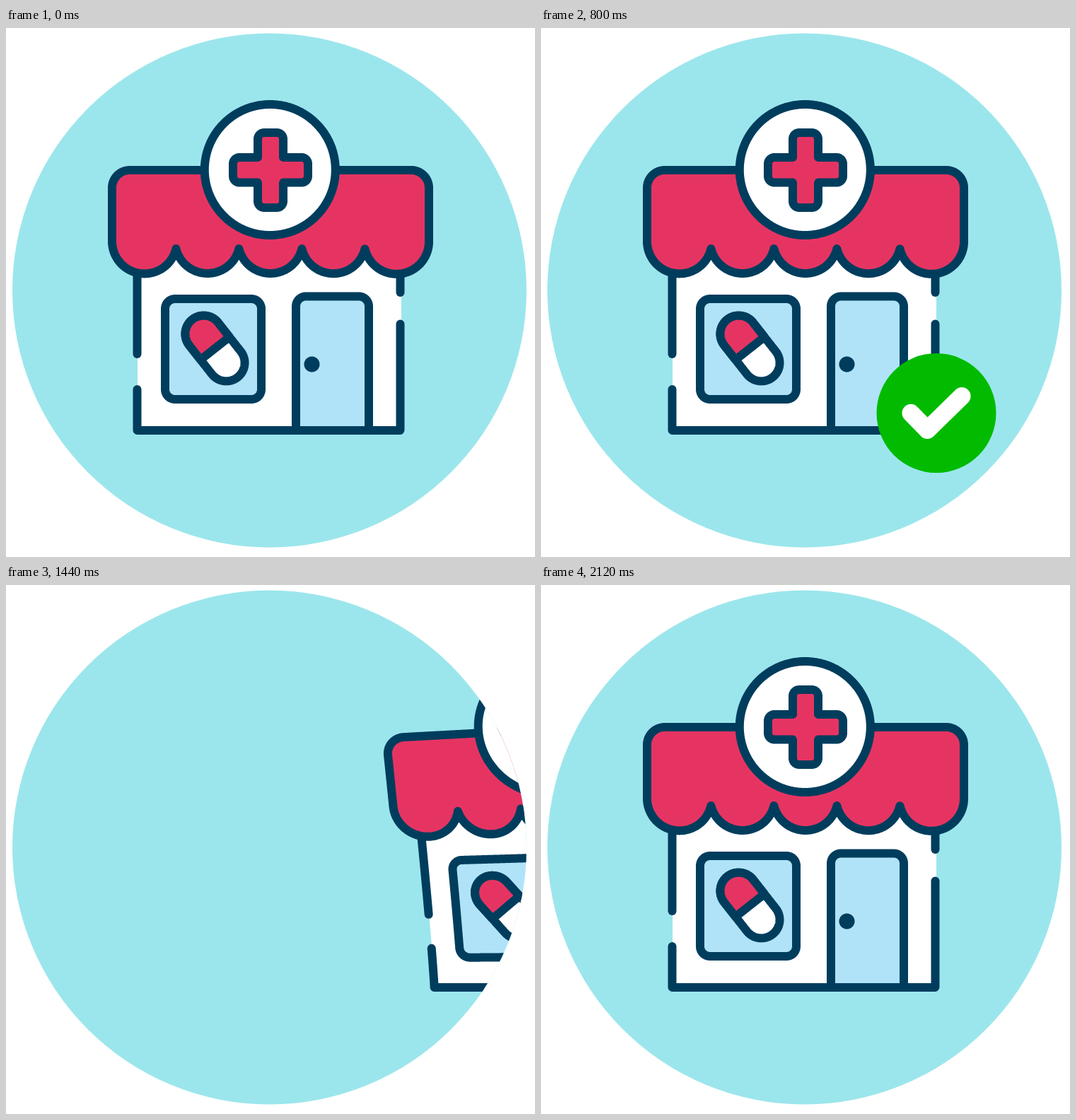
An HTML page with a canvas for the animation above (2160 ms loop, 748 by 748 pixels).

```html
<!DOCTYPE html>
<html lang="en">
<head>
<meta charset="utf-8">
<title>Pharmacy</title>
<style>
html, body { margin: 0; width: 100%; height: 100%; overflow: hidden; background: #fff; }
canvas { display: block; width: 748px; height: 748px; }
</style>
</head>
<body>
<canvas id="stage"></canvas>
<script>
const SIZE = 748, LOOP = 2160, TICK = 40, GROUND = 569;
const NAVY = '#003d5d', RED = '#e63462', GLASS = '#b0e3f8', SKY = '#9be6ec', GREEN = '#02bb01', WHITE = '#fff';

const canvas = document.getElementById('stage');
const ratio = window.devicePixelRatio || 1;
canvas.width = canvas.height = SIZE * ratio;
const ctx = canvas.getContext('2d');

// Turns path data into closely spaced points, so that it can be bent.
function sample(d) {
  const path = document.createElementNS('http://www.w3.org/2000/svg', 'path');
  path.setAttribute('d', d);
  const length = path.getTotalLength(), count = Math.ceil(length);
  return Array.from({ length: count + 1 }, (_, i) => path.getPointAtLength(length * i / count));
}

const shape = (d, fill, line = NAVY) => ({ points: sample(d), closed: /Z$/.test(d), fill, line });

const disc = (x, y, r) => `M${x - r} ${y}a${r} ${r} 0 0 1 ${2 * r} 0a${r} ${r} 0 0 1 ${-2 * r} 0Z`;

const box = (x, y, w, h, r) =>
  `M${x + r} ${y}h${w - 2 * r}a${r} ${r} 0 0 1 ${r} ${r}v${h - 2 * r}a${r} ${r} 0 0 1 ${-r} ${r}` +
  `h${2 * r - w}a${r} ${r} 0 0 1 ${-r} ${-r}v${2 * r - h}a${r} ${r} 0 0 1 ${r} ${-r}Z`;

const scallop = (x, y = 312) => `A45.8 45.8 0 0 0 ${x} ${y}`;
const awning = 'M150 226V302' + [240.4, 329.4, 418.4, 507.5].map(x => scallop(x)).join('') +
  scallop(598, 302) + 'V226A25 25 0 0 0 573 201H175A25 25 0 0 0 150 226Z';

const cross = 'M365 148h18a9 9 0 0 1 9 9v26h26a9 9 0 0 1 9 9v17.5a9 9 0 0 1 -9 9h-26v26.5' +
  'a9 9 0 0 1 -9 9h-18a9 9 0 0 1 -9 -9v-26.5h-26a9 9 0 0 1 -9 -9v-17.5a9 9 0 0 1 9 -9h26v-26a9 9 0 0 1 9 -9Z';

const pill = 'M299.4 415.9L332.4 457.9A26 26 0 0 1 291.6 490.1L258.6 448.1A26 26 0 0 1 299.4 415.9Z';
const pillTop = 'M275.1 469.1L258.6 448.1A26 26 0 0 1 299.4 415.9L315.9 436.9Z';

const shop = [
  shape('M186 308H559V569H186Z', WHITE, null),
  shape('M185.5 340V461'),
  shape('M557.5 340V374'),
  shape('M185.5 511V569H557.5V418.5'),
  shape(box(225, 383, 136, 142, 14), GLASS),
  shape(pill, WHITE),
  shape(pillTop, RED),
  shape('M410 569V393.5A14 14 0 0 1 424 379.5H499A14 14 0 0 1 513 393.5V569Z', GLASS),
  shape(disc(432.5, 475.5, 11), NAVY, null),
  shape(awning, RED),
  shape(disc(373.3, 200.5, 92.5), WHITE),
  shape(cross, RED)
];

// Steps of [time, value], eased by a sine in between.
const LEAN = [[880, 0], [1020, 1.05], [1215, -2.05], [1300, -2], [1560, -1.35], [1800, 1], [1980, 0]];
const BADGE = [[20, 0], [280, 1.1], [420, 1], [640, 1], [760, 1.1], [940, 0]];

function tween(steps, t) {
  const next = steps.findIndex(step => step[0] > t);
  if (next === 0) return steps[0][1];
  if (next < 0) return steps[steps.length - 1][1];
  const [t0, v0] = steps[next - 1], [t1, v1] = steps[next];
  return v0 + (v1 - v0) * (1 - Math.cos(Math.PI * (t - t0) / (t1 - t0))) / 2;
}

// Out to the left, then in again from the right.
function slide(t) {
  if (t < 900 || t >= 1800) return 0;
  if (t < 1300) return -38 * ((t - 900) / 100) ** 2.02;
  return 190 * ((1800 - t) / 200) ** 1.35;
}

// The ground line stays flat; the lean grows with height.
function bend({ x, y }, shift, lean) {
  const h = Math.max(0, GROUND - y) / 369;
  return [
    x + shift + 20 * lean * h ** 1.15,
    y + (0.033 * lean * (x - 405) + 0.65 * lean * lean) * h ** 0.85
  ];
}

function drawShape({ points, closed, fill, line }, shift, lean) {
  ctx.beginPath();
  for (const p of points) ctx.lineTo(...bend(p, shift, lean));
  if (closed) ctx.closePath();
  if (fill) {
    ctx.fillStyle = fill;
    ctx.fill();
  }
  if (line) {
    ctx.strokeStyle = line;
    ctx.lineWidth = 12;
    ctx.stroke();
  }
}

function drawBadge(scale) {
  if (scale <= 0) return;
  ctx.save();
  ctx.translate(559, 544.5);
  ctx.scale(scale, scale);
  ctx.beginPath();
  ctx.arc(0, 0, 87, 0, 2 * Math.PI);
  ctx.fillStyle = GREEN;
  ctx.fill();
  ctx.beginPath();
  ctx.moveTo(-37, 0);
  ctx.lineTo(-13, 24.5);
  ctx.lineTo(37, -24.5);
  ctx.strokeStyle = WHITE;
  ctx.lineWidth = 26;
  ctx.stroke();
  ctx.restore();
}

function draw(t) {
  ctx.setTransform(ratio, 0, 0, ratio, 0, 0);
  ctx.lineCap = ctx.lineJoin = 'round';
  ctx.fillStyle = WHITE;
  ctx.fillRect(0, 0, SIZE, SIZE);
  ctx.save();
  ctx.beginPath();
  ctx.arc(372.5, 371, 363.5, 0, 2 * Math.PI);
  ctx.fillStyle = SKY;
  ctx.fill();
  ctx.clip();
  const shift = slide(t), lean = tween(LEAN, t);
  for (const part of shop) drawShape(part, shift, lean);
  ctx.restore();
  drawBadge(tween(BADGE, t));
}

const start = performance.now();
function loop() {
  const t = (performance.now() - start) % LOOP;
  draw(Math.floor(t / TICK) * TICK);
  requestAnimationFrame(loop);
}
loop();
</script>
</body>
</html>
```
